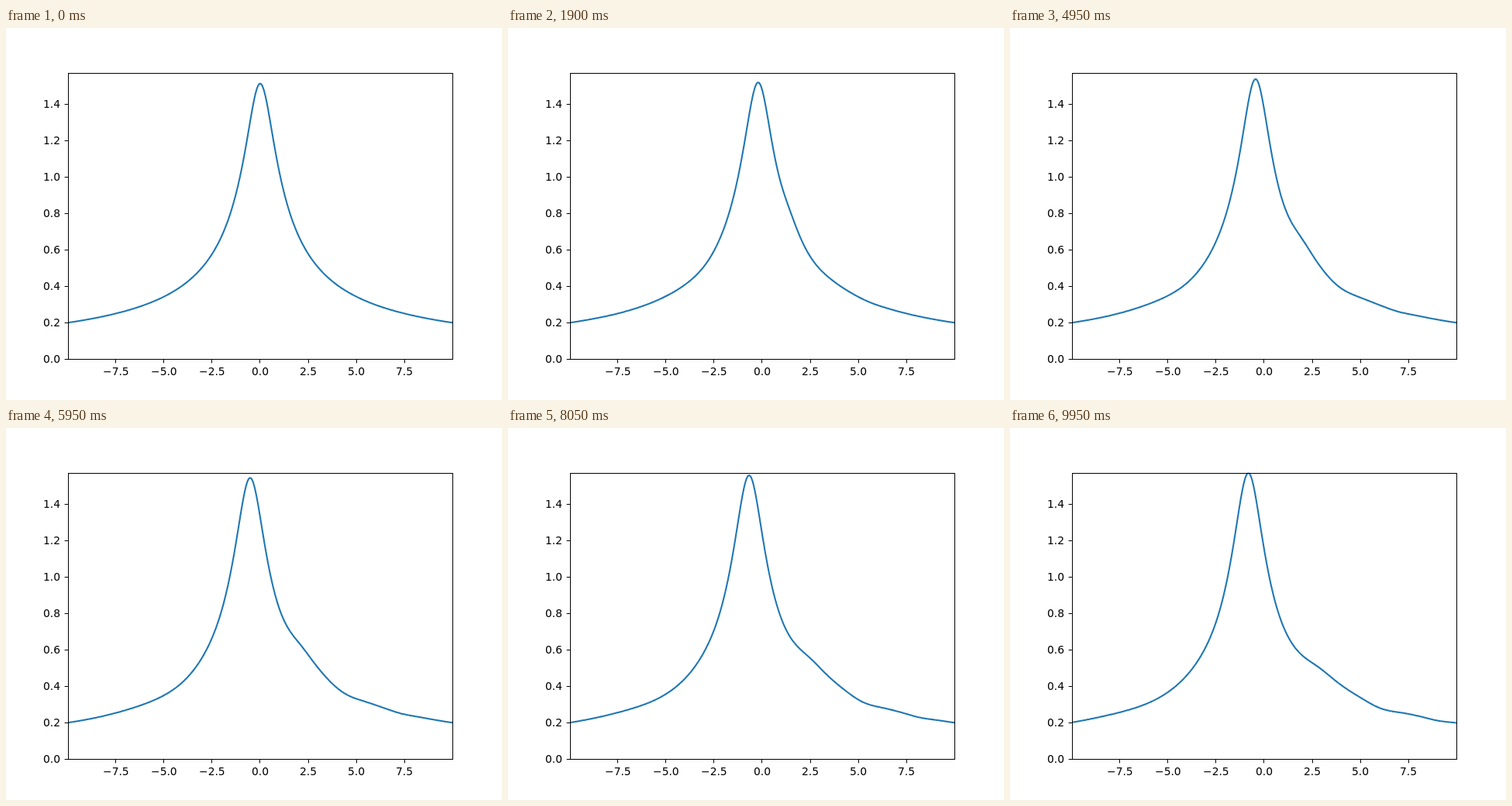
Recreate the animation shown at these times as an HTML page. Size 640x480 px, loop 10000 ms.

```html
<!DOCTYPE html>
<html lang="en">
<head>
<meta charset="utf-8">
<title>Travelling pulse</title>
<style>
  html, body { margin: 0; width: 100%; height: 100%; overflow: hidden; background: #fff; }
  svg { display: block; width: 640px; height: 480px; }
  text { font: 13.89px "DejaVu Sans", sans-serif; fill: #000; }
  .axis { fill: none; stroke: #000; stroke-width: 1; }
  #curve { fill: none; stroke: #1f77b4; stroke-width: 2.08; stroke-linejoin: round; }
</style>
</head>
<body>
<svg viewBox="0 0 640 480">
  <clipPath id="plot"><rect x="80" y="57.6" width="496" height="369.6"/></clipPath>
  <g id="ticks"></g>
  <path id="curve" clip-path="url(#plot)"/>
  <rect class="axis" x="80.5" y="58.5" width="496" height="369"/>
</svg>
<script>
const LOOP = 10000, STEP = 50;
const { exp, abs, floor, round } = Math;
const px = x => 327.95 + 24.83 * x;
const py = y => 427.2 - 234.8 * y;
const bump = (x, center, width) => exp(-(((x - center) / width) ** 2));
const plateau = (x, width) => exp(-((x / width) ** 4));

// Symmetric heavy-tailed pulse at rest.
const pulse = x => 1.514 * (1 + x * x / 0.597) ** -0.395;

// Local displacement: the peak drifts left while ripples run outwards.
function shift(x, t) {
  const drift = 0.075 * t + 0.075 * (1 - exp(-t));
  if (x < 0) {
    return drift * plateau(x, 2 + 0.35 * t)
      + 0.025 * t * bump(x, -4.5 - 0.36 * t, 2);
  }
  return drift * plateau(x, 1 + 0.155 * t)
    + 0.05 * t * bump(x, 1.95 + 0.43 * t, 0.95)
    + 0.03 * t * bump(x, 4.9 + 0.42 * t, 0.75);
}

function height(x, t) {
  const s = x + shift(x, t);
  const growth = 0.0066 * (t - 1.2 * (1 - exp(-t / 1.2)));
  return pulse(s) + growth * bump(s, 0, 1);
}

function curvePath(t) {
  const points = [];
  for (let x = -10; x <= 10.001; x += 0.04) {
    points.push(px(x).toFixed(2) + " " + py(height(x, t)).toFixed(2));
  }
  return "M" + points.join("L");
}

const ticks = document.getElementById("ticks");

function add(tag, attrs) {
  const node = document.createElementNS("http://www.w3.org/2000/svg", tag);
  for (const name in attrs) node.setAttribute(name, attrs[name]);
  return ticks.appendChild(node);
}

// Places a label on whole pixels; align is the share of its width left of x.
function addLabel(label, x, y, align) {
  const node = add("text", { y });
  node.textContent = label;
  node.setAttribute("x", round(x - align * node.getComputedTextLength()));
}

function drawTicks() {
  const snap = v => floor(v) + 0.5;
  for (let x = -7.5; x <= 7.5; x += 2.5) {
    add("path", { class: "axis", d: `M${snap(px(x))} 427.5v4.86` });
    addLabel((x < 0 ? "\u2212" : "") + abs(x).toFixed(1), px(x), 448, 0.5);
  }
  for (let i = 0; i <= 7; i++) {
    const y = py(i / 5);
    add("path", { class: "axis", d: `M80.5 ${snap(y)}h-4.86` });
    addLabel((i / 5).toFixed(1), 70.3, floor(y + 5.3), 1);
  }
}

const curve = document.getElementById("curve");
const start = performance.now();
let shown = -1;

function frame() {
  let ms = floor(((performance.now() - start) % LOOP) / STEP) * STEP;
  if (ms === 5000) ms -= STEP; // one step is held twice as long
  if (ms !== shown) {
    shown = ms;
    curve.setAttribute("d", curvePath(ms / 1000));
  }
  requestAnimationFrame(frame);
}

drawTicks();
frame();
</script>
</body>
</html>
```
